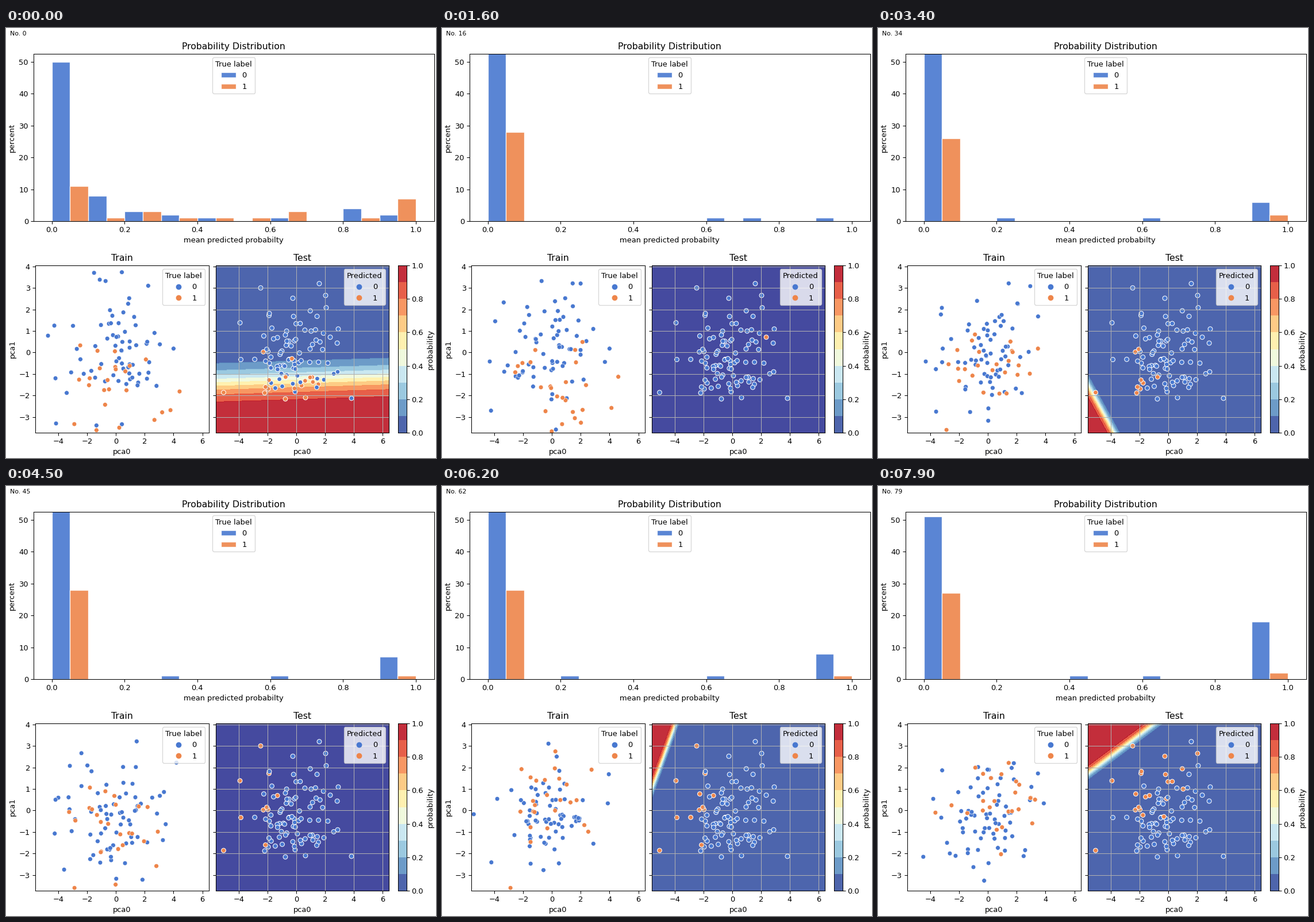
These frames come from a looping animation (748 by 748 pixels, 8 s). A matplotlib script:

```python
import numpy as np
import matplotlib.pyplot as plt
from matplotlib.animation import FuncAnimation
from matplotlib.lines import Line2D
from matplotlib.patches import Patch

SIZE, DPI, FRAMES = 748, 93.5, 80
BLUE, ORANGE = "#4878d0", "#ee854a"
CMAP = plt.get_cmap("RdYlBu_r")
XLIM, YLIM = (-5.6, 6.45), (-3.73, 4.045)

# Key steps of the run, and the values passed through at each of them.
STEPS = [0, 8, 16, 34, 45, 62, 79]
LOGIT = [  # probability = sigmoid(a*x + b*y + c)
    [.05, 1.42, 4, -5.2, -3, -8.5, -3.55],
    [-2.45, -3.17, 0, -4.25, 1, 4.6, 7.1],
    [-3.15, -17.3, -33, -35.7, -60, -52.4, -32.3]]
PREDICTED_ONES = [17, 7, 1, 9, 10, 12, 21]
FIRST_ORANGE = [11, 26, 28, 26, 28, 28, 27]
LAST_ORANGE = [7, 2, 0, 1.6, 1, 1, 2]
LAST_BLUE = [2, 3, 1, 6, 7, 8, 18]

# Counts of the inner bins at the start; they fade as the model gets surer.
INNER_BLUE = np.array([8, 3, 2, 1, 0, 1, 0, 4])
INNER_ORANGE = np.array([1, 3, 1, 1, 1, 3, 0, 1])

TEST_RIM = [(-2.48, 3), (1.6, 3.2), (2.04, 2.65), (-.24, 2.52), (2.08, 2.08),
            (-3.92, 1.38), (2.92, 1.09), (2.88, -.9), (-3.86, -.33),
            (-5.06, -1.86), (-2.2, -1.88), (-.76, -2.16), (.64, -2.1),
            (3.84, -2.13)]

# Far-out training points: x, y, first step, last step, label.
TRAIN_RIM = [(-.72, 3.32, 0, 18, 0), (.92, 2.52, 0, 20, 0),
             (4, .18, 0, 24, 0), (-4.2, -1.2, 0, 10, 0),
             (-4.16, -3.3, 0, 11, 0), (-4.72, .78, 0, 11, 0),
             (-1.52, 3.7, 0, 9, 0), (2.24, 3.1, 0, 9, 0),
             (1.44, 3.21, 15, 48, 0), (-4.32, -.42, 14, 38, 0),
             (-2.88, -3.6, 30, 68, 1), (-3.6, -2.75, 30, 50, 0),
             (3.88, .33, 58, 79, 0), (-3.8, .54, 56, 79, 0)]


def at_step(values, n):
    return np.interp(n, STEPS, values)


def bin_counts(n):
    fade = np.exp(-n / 5)
    inner_blue = np.rint(INNER_BLUE * fade)
    inner_orange = np.rint(INNER_ORANGE * fade)
    if n >= 8:
        stray = np.random.default_rng([7, n // 2]).choice(8, 2, replace=False)
        inner_blue[stray] = 1
    first, last, last_blue = (np.rint(at_step(v, n)) for v in
                              (FIRST_ORANGE, LAST_ORANGE, LAST_BLUE))
    orange = np.array([first, *inner_orange, last])
    rest = 100 - orange.sum() - inner_blue.sum() - last_blue
    return np.array([rest, *inner_blue, last_blue]), orange


def make_test_points():
    rng = np.random.default_rng(5)
    cloud = rng.normal((-.1, 0), (1.7, 1.25), (400, 2))
    inside = (np.abs(cloud[:, 0]) < 2.9) & (np.abs(cloud[:, 1]) < 1.95)
    return np.vstack([TEST_RIM, cloud[inside][:84]])


def train_point(n, slot, label):
    """A random point that is replaced every few steps."""
    life = 9 + slot % 7
    generation, age = divmod(n + slot * 5, life)
    rng = np.random.default_rng([label, slot, generation])
    if label:
        height = -1.7 + 2.6 * (n - age) / FRAMES
        return rng.normal((.1, height), (1.6, 1))
    return rng.normal((0, -.1), (1.7, 1.25))


def train_points(n, total, label):
    pts = [(x, y) for x, y, first, last, kind in TRAIN_RIM
           if kind == label and first <= n <= last]
    return pts + [train_point(n, s, label) for s in range(total - len(pts))]


def panel(left, top, right, bottom, title="", xlabel="", ylabel=""):
    ax = fig.add_axes([left / SIZE, 1 - bottom / SIZE,
                       (right - left) / SIZE, (bottom - top) / SIZE])
    ax.set(title=title, xlabel=xlabel, ylabel=ylabel)
    return ax


def dot_legend(ax, title):
    dots = [Line2D([], [], ls="", marker="o", ms=7.5, mew=0, color=c)
            for c in (BLUE, ORANGE)]
    ax.legend(dots, ["0", "1"], title=title, loc="upper right")


fig = plt.figure(figsize=(SIZE / DPI, SIZE / DPI), dpi=DPI, facecolor="white")
counter = fig.text(.01, 1 - 13 / SIZE, "", fontsize="small")

hist = panel(48, 45, 744.5, 336, "Probability Distribution",
             "mean predicted probabilty", "percent")
hist.set(xlim=(-.05, 1.05), ylim=(0, 52.5))
edges = np.arange(10) / 10
style = dict(edgecolor="w", alpha=.9)
blue_bars = hist.bar(edges, 0, .05, align="edge", color=BLUE, **style)
orange_bars = hist.bar(edges + .05, 0, .05, align="edge", color=ORANGE, **style)
hist.legend([Patch(fc=c, **style) for c in (BLUE, ORANGE)], ["0", "1"],
            title="True label", loc="upper center")

train = panel(51, 413, 352.8, 704, "Train", "pca0", "pca1")
test = panel(365, 413, 666.2, 704, "Test", "pca0")
for ax in (train, test):
    ax.set(xlim=XLIM, ylim=YLIM, xticks=range(-4, 7, 2), yticks=range(-3, 5))
test.tick_params(labelleft=False)
test.grid()
dot_legend(train, "True label")
dot_legend(test, "Predicted")

bar = panel(682, 413, 696.5, 704, ylabel="probability")
bar.imshow((edges + .05)[:, None], cmap=CMAP, vmin=0, vmax=1, alpha=.9,
           origin="lower", extent=(0, 1, 0, 1), aspect="auto")
bar.set(xticks=[], yticks=np.arange(6) / 5)
bar.yaxis.tick_right()
bar.yaxis.set_label_position("right")

test_xy = make_test_points()
test_noise = np.random.default_rng(3).normal(0, 1, len(test_xy))
train_dots = train.scatter([], [], s=36, edgecolor="w", linewidth=.48)
test_dots = test.scatter(*test_xy.T, s=36, edgecolor="w", linewidth=.8)
grid_x, grid_y = np.meshgrid(np.linspace(*XLIM, 121), np.linspace(*YLIM, 101))
surface = None


def draw_surface(a, b, c):
    global surface
    if surface is not None:
        surface.remove()
    prob = 1 / (1 + np.exp(-(a * grid_x + b * grid_y + c)))
    levels = 10 if prob.max() > 1e-5 else [-1, 1]
    surface = test.contourf(grid_x, grid_y, prob, levels=levels, cmap=CMAP,
                            vmin=0, vmax=1, alpha=.9, zorder=.5)


def update(n):
    counter.set_text(f"No. {n}")

    for rects, counts in zip((blue_bars, orange_bars), bin_counts(n)):
        for rect, count in zip(rects, counts):
            rect.set_height(count)
            rect.set_visible(count > 0)

    zeros, ones = train_points(n, 70, 0), train_points(n, 25, 1)
    train_dots.set_offsets(np.vstack([zeros, ones]))
    train_dots.set_facecolor([BLUE] * len(zeros) + [ORANGE] * len(ones))

    # The points furthest along the slope, give or take noise, become ones.
    a, b, c = (at_step(values, n) for values in LOGIT)
    score = test_xy @ (a, b) / np.hypot(a, b) + test_noise
    rank = np.argsort(np.argsort(-score))
    ones_count = round(at_step(PREDICTED_ONES, n))
    test_dots.set_facecolor([ORANGE if r < ones_count else BLUE for r in rank])
    draw_surface(a, b, c)


anim = FuncAnimation(fig, update, frames=FRAMES, interval=100,
                     init_func=lambda: None, repeat=True, repeat_delay=0)
plt.show()
```
